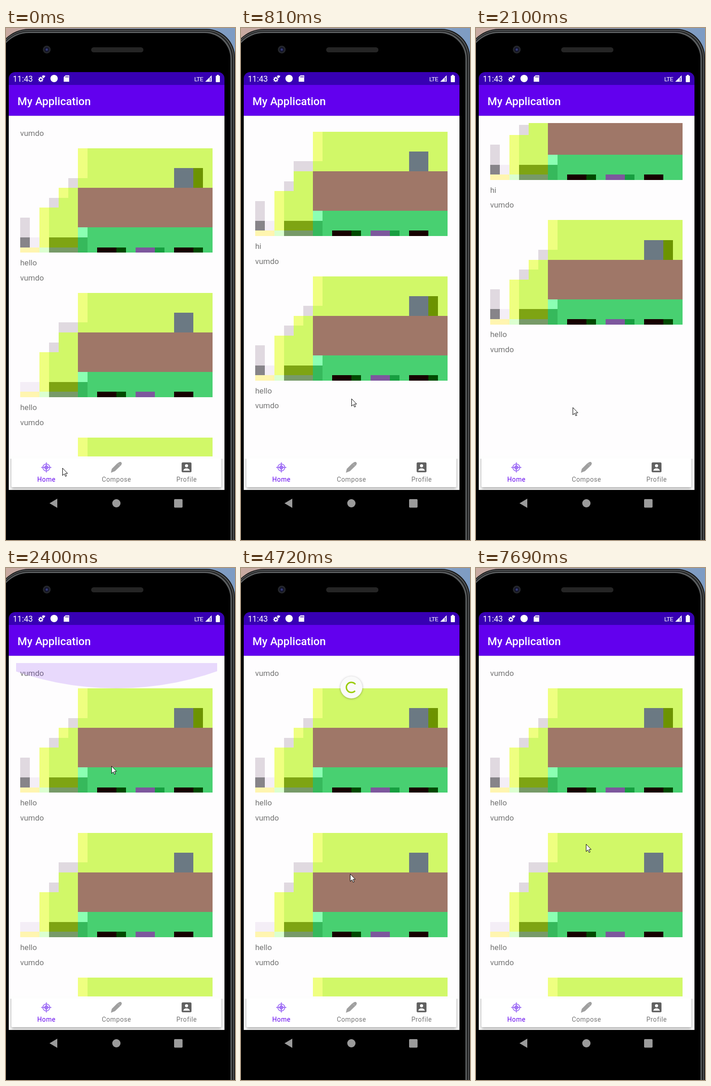
Animation, 500 px wide and 1115 px high, one loop 7990 ms. Source, as an HTML page with a canvas:

```html
<!DOCTYPE html>
<html lang="en">
<head>
<meta charset="utf-8">
<style>
  html, body { margin: 0; height: 100%; overflow: hidden; background: #000; }
  canvas { display: block; }
</style>
</head>
<body>
<canvas id="stage" width="500" height="1115"></canvas>
<script>
const ctx = document.getElementById('stage').getContext('2d');
const LOOP = 7990, TAU = Math.PI * 2;
const USER = 'vumdo';
const PURPLE = '#6200ee';

const bursts = [[120, 1080], [1200, 2100], [2250, 3240], [3490, 4420],
                [4570, 5560], [5710, 6640], [6790, 7690]];
const ticks = [0, ...bursts.flatMap(([a, b]) =>
  Array.from({ length: 8 }, (_, i) => a + (b - a) * i / 7))];

// [time, x, y]
const cursorPath = [[0, 123, 958], [120, 128, 950], [390, 240, 760], [600, 244, 560],
  [806, 241, 807], [1080, 238, 685], [1500, 225, 760], [1900, 211, 826], [2100, 211, 826],
  [2250, 222, 330], [2391, 230, 431], [2674, 232, 240], [3098, 238, 666],
  [5750, 238, 666], [6350, 240, 597], [6790, 240, 597], [7000, 240, 601]];
// [time, offset]
const scrollPath = [[0, 0], [380, 0], [531, 260], [669, 550], [806, 666],
  [1080, 770], [1250, 788], [2130, 788], [2250, 600], [2380, 0]];

const clamp = v => Math.max(0, Math.min(1, v));
const span = (t, a, b) => clamp((t - a) / (b - a));
const mix = (a, b, p) => a + (b - a) * p;

function along(path, t) {
  const i = path.findIndex(k => k[0] > t);
  if (i < 0) return path.at(-1).slice(1);
  const a = path[i - 1], b = path[i], p = span(t, a[0], b[0]);
  return a.slice(1).map((v, j) => mix(v, b[j + 1], p));
}

// cubic-bezier(.4, 0, .2, 1)
function fastOutSlowIn(x) {
  let lo = 0, hi = 1;
  for (let i = 0; i < 16; i++) {
    const s = (lo + hi) / 2;
    if (1.2 * s * (1 - s) ** 2 + 0.6 * s * s * (1 - s) + s ** 3 < x) lo = s; else hi = s;
  }
  return lo * lo * (3 - 2 * lo);
}

function rect(x, y, w, h, color) {
  ctx.fillStyle = color;
  ctx.fillRect(x, y, w, h);
}
function round(x, y, w, h, r, color) {
  ctx.beginPath();
  ctx.roundRect(x, y, w, h, r);
  ctx.fillStyle = color;
  ctx.fill();
}
function disc(x, y, r, color) {
  ctx.beginPath();
  ctx.arc(x, y, r, 0, TAU);
  ctx.fillStyle = color;
  ctx.fill();
}
function poly(points, color) {
  ctx.beginPath();
  points.forEach(p => ctx.lineTo(...p));
  ctx.closePath();
  ctx.fillStyle = color;
  ctx.fill();
}
function ring(x, y, r, width, color, from = 0, to = TAU) {
  ctx.beginPath();
  ctx.arc(x, y, r, from, to);
  ctx.lineWidth = width;
  ctx.strokeStyle = color;
  ctx.stroke();
}
function text(str, x, y, size, color, { weight = 400, align = 'left', spacing = 0 } = {}) {
  ctx.font = `${weight} ${size}px Roboto, sans-serif`;
  ctx.textAlign = align;
  ctx.letterSpacing = spacing + 'px';
  ctx.fillStyle = color;
  ctx.fillText(str, x, y);
}
function clipped(x, y, w, h, draw) {
  ctx.save();
  ctx.beginPath();
  ctx.rect(x, y, w, h);
  ctx.clip();
  draw();
  ctx.restore();
}

function phone() {
  const sky = ctx.createLinearGradient(0, 0, 500, 0);
  sky.addColorStop(0, '#c9aaa0');
  sky.addColorStop(0.3, '#a9a3b0');
  sky.addColorStop(1, '#7d9cc4');
  rect(0, 0, 500, 1115, sky);
  round(-22, 2, 522, 1200, [72, 62, 0, 0], '#161616');
  round(-21, 4, 519, 1200, [71, 61, 0, 0], '#55585a');
  round(-20, 6, 516, 1200, [70, 60, 0, 0], '#202122');
  round(-19, 8, 512, 1200, [69, 58, 0, 0], '#5a5d5f');
  round(-18, 11, 508, 1200, [68, 56, 0, 0], '#000');
  disc(89, 47, 8.5, '#25272b');
  disc(89, 47, 5.5, '#14162b');
  disc(89, 47, 2.5, '#343a78');
  round(186, 42, 114, 11, 5.5, '#252525');
  poly([[95, 1035], [112, 1025], [112, 1045]], '#9b9b9b');
  disc(241, 1035, 9, '#9b9b9b');
  round(367, 1026, 18.5, 18.5, 2, '#9b9b9b');
}

function bars() {
  round(6, 96, 471, 30, [14, 14, 0, 0], '#3700b3');
  rect(6, 124, 471, 67, PURPLE);
  rect(6, 191, 471, 1, '#d8d3e2');
  text('My Application', 25, 167.5, 24, '#fff', { weight: 500 });
  text('11:43', 15, 117, 17.5, '#fff');

  ring(76, 112, 3.2, 2.4, '#fff');
  for (let i = 0; i < 8; i++) {
    const a = i * TAU / 8;
    disc(76 + 4.8 * Math.cos(a), 112 + 4.8 * Math.sin(a), 1.1, '#fff');
  }
  poly([[78, 104.5], [82, 103], [86, 104.5], [82, 110]], '#fff');
  disc(105, 110, 8, '#fff');
  poly([[130, 103], [138, 103], [138, 117], [126, 117], [126, 107]], '#fff');
  for (let x = 130; x < 137; x += 2.5) rect(x, 104.5, 1.2, 3.5, '#3700b3');

  text('LTE', 411, 115.5, 13.5, '#fff', { spacing: -0.6 });
  poly([[449, 103], [449, 117], [435, 117]], '#fff');
  rect(445, 108, 1.5, 8, '#3700b3');
  round(458, 104, 9, 14, 1, '#fff');
  rect(460.5, 102, 4, 3, '#fff');
}

function tabs() {
  rect(6, 933, 471, 73, '#fdfdfd');
  clipped(6, 938, 471, 68, () => {
    ctx.shadowColor = 'rgba(0,0,0,.35)';
    ctx.shadowBlur = 6;
    ctx.shadowOffsetY = 3;
    round(12, 930, 458, 70, 2, '#fff');
  });
  const label = { align: 'center', spacing: 0.6 };
  text('Home', 88.3, 988, 14, PURPLE, label);
  text('Compose', 241.3, 988, 14, '#757575', label);
  text('Profile', 394.3, 988, 14, '#757575', label);

  const lilac = '#a273f5';
  ring(88, 957, 7.6, 2, lilac);
  rect(87, 946, 2, 22, lilac);
  rect(77, 956, 22, 2, lilac);
  poly([[88, 951], [94, 957], [88, 963], [82, 957]], lilac);

  poly([[229, 968.5], [231, 960], [243, 948], [248, 945], [251, 945], [253, 948],
        [251.5, 952], [238, 965]], '#a0a0a0');
  ctx.beginPath();
  ctx.moveTo(243, 948);
  ctx.lineTo(250, 954);
  ctx.lineWidth = 0.8;
  ctx.strokeStyle = '#c4c4c4';
  ctx.stroke();

  round(383.5, 946, 21.5, 21.5, 2.5, '#616161');
  disc(394.2, 953.3, 3.4, '#fff');
  clipped(387, 957, 15, 7, () => {
    ctx.beginPath();
    ctx.ellipse(394.2, 964, 7, 5, 0, 0, TAU);
    ctx.fillStyle = '#fff';
    ctx.fill();
  });
}

// Blocky picture on a 20-column grid; detail 0..2 adds patches.
function picture(top, detail) {
  const cell = (c, r, w, h, color) => {
    const y = Math.round(top + r * 21.55);
    rect(31 + c * 21, y, w * 21, Math.round(top + (r + h) * 21.55) - y, color);
  };
  const lime = '#d1f868', lemon = '#efff80', ash = '#e0d9e0', black = '#170000', forest = '#004900';
  cell(6, 0, 14, 4, lime);
  cell(4, 4, 2, 5, lime);
  cell(3, 6, 1, 3, lime);
  cell(6, 0, 1, 3, lemon);
  cell(2, 6, 1, 4, lemon);
  cell(3, 5, 1, 1, ash);
  cell(1, 9, 1, 1, '#f4eef6');
  cell(3, 9, 3, 1, '#7ea413');
  cell(0, 10, 2, 0.54, '#fff5b0');
  cell(2, 10, 1, 0.54, '#dbffd0');
  cell(3, 10, 3, 0.54, '#779a68');
  cell(6, 4, 14, 4, '#9f7768');
  cell(6, 8, 14, 2.54, '#48d071');
  cell(6, 8, 1, 1, '#8bffb3');
  cell(6, 9, 1, 1.54, '#36b95c');
  cell(16, 2, 2, 2, '#6b7983');
  cell(8, 10, 2, 0.54, black);
  cell(10, 10, 1, 0.54, forest);
  cell(12, 10, 2, 0.54, '#7d579d');
  cell(16, 10, 2, 0.54, black);
  if (detail > 0) {
    cell(0, 7, 1, 2, ash);
    cell(0, 9, 1, 1, '#878489');
    cell(14, 10, 1, 0.54, '#179e40');
  } else {
    cell(0, 9, 1, 1, '#f4eef6');
  }
  if (detail > 1) {
    cell(5, 3, 1, 1, ash);
    cell(4, 4, 1, 1, lemon);
    cell(18, 2, 1, 2, '#6c9300');
    cell(18, 10, 1, 0.54, forest);
  } else {
    cell(4, 3, 2, 1, ash);
  }
}

const posts = [['hello', 2], ['hello', 0], ['hi', 1], ['hello', 2], null];

function feed(scroll) {
  posts.forEach((post, i) => {
    const top = 262 + i * 314.8 - scroll;
    text(USER, 31, top - 27, 17, '#757575');
    if (!post) return;
    picture(top, post[1]);
    text(post[0], 31, top + 255, 17, '#757575');
  });
}

function edgeGlow(t) {
  if (t < 2380) return;
  const fade = 1 - span(t, 2400, 2900);
  if (!fade) return;
  const radius = 670, bottom = 207 + 55 * fade;
  clipped(22, 207, 439, 60, () => disc(241, bottom - radius, radius, `rgba(98,0,238,${0.14 * fade})`));
}

const hues = [[0, 221, 255], [153, 204, 0], [255, 187, 51], [255, 68, 68]];
const REST = 260, PULL = 77, DRAG = 2674, RELEASE = 3321, SPIN = 3521, FINISH = 666, CYCLE = 1332, HIDE = 7180;

function pullState(fingerY) {
  const over = Math.max(0, (fingerY - 240) / 2), part = Math.min(1, over / PULL);
  const q = Math.min(Math.max(0, over - PULL), 2 * PULL) / PULL / 4;
  const tension = (q - q * q) * 2;
  const adjusted = Math.max(part - 0.4, 0) * 5 / 3;
  return { y: REST - PULL + PULL * part + PULL * tension * 2, start: 0, end: 0.8 * adjusted,
           turn: (-0.25 + 0.4 * adjusted + tension * 2) / 2, arrow: adjusted,
           alpha: over > PULL ? 1 : 0.3 };
}

// Arc start and end are in turns.
function spinState(t) {
  const since = t - SPIN - FINISH;
  const held = pullState(666);
  if (since < 0) {
    const p = span(t, SPIN, SPIN + FINISH);
    return { y: REST, start: 0.79 * p, end: 0.8, turn: mix(held.turn, 1, p), cycle: 0, p };
  }
  const n = Math.floor(since / CYCLE), p = since / CYCLE - n;
  let start = 0, end = 0.01 + 0.79 * fastOutSlowIn(Math.min(1, p * 2));
  if (p > 0.5) {
    end = 0.8;
    start = 0.79 * fastOutSlowIn(p * 2 - 1);
  }
  return { y: REST, start, end, turn: -0.2 + n * 1.6 + 0.81 * p, cycle: n + 1, p };
}

function spinner(t, fingerY) {
  if (t < DRAG || t > HIDE + 150) return;
  let s;
  if (t < SPIN) {
    s = pullState(fingerY);
    const p = span(t, RELEASE, SPIN);
    s.y = mix(s.y, REST, 1 - (1 - p) ** 2);
    if (p) s.arrow = 0;
  } else {
    s = spinState(t);
  }
  const { cycle = 0, p = 0, alpha = 1, arrow = 0 } = s;
  const blend = span(p, 0.75, 1), next = hues[(cycle + 1) % 4];
  const color = `rgb(${hues[cycle % 4].map((v, i) => Math.round(mix(v, next[i], blend)))})`;

  clipped(6, 207, 471, 726, () => {
    ctx.translate(241, s.y);
    const size = 1 - span(t, HIDE, HIDE + 150);
    ctx.scale(size, size);
    ctx.shadowColor = 'rgba(0,0,0,.3)';
    ctx.shadowBlur = 4;
    ctx.shadowOffsetY = 1;
    disc(0, 0, 24, '#fafafa');
    ctx.shadowColor = 'transparent';
    ctx.globalAlpha = alpha;
    const from = (s.start + s.turn) * TAU, to = (s.end + s.turn) * TAU;
    ring(0, 0, 11, 3, color, from, to);
    if (arrow) {
      ctx.rotate(to);
      poly([[11 - 5 * arrow, 0], [11 + 5 * arrow, 0], [11, 5 * arrow]], color);
    }
  });
}

function cursor(x, y) {
  ctx.save();
  ctx.translate(x + 0.5, y + 0.5);
  poly([[0, 0], [0, 16], [3.7, 12.5], [6.3, 18], [8.7, 17], [6.2, 11.5], [11, 11.5]], '#fff');
  ctx.lineWidth = 1;
  ctx.strokeStyle = '#000';
  ctx.stroke();
  ctx.restore();
}

function draw(t) {
  const [x, y] = along(cursorPath, t), [scroll] = along(scrollPath, t);
  phone();
  rect(6, 124, 471, 882, '#fefdfe');
  clipped(6, 207, 471, 726, () => feed(scroll));
  edgeGlow(t);
  spinner(t, y);
  bars();
  tabs();
  cursor(Math.round(x), Math.round(y));
}

function frame() {
  const now = performance.now() % LOOP;
  draw(ticks.findLast(tick => tick <= now));
  requestAnimationFrame(frame);
}
frame();
</script>
</body>
</html>
```
